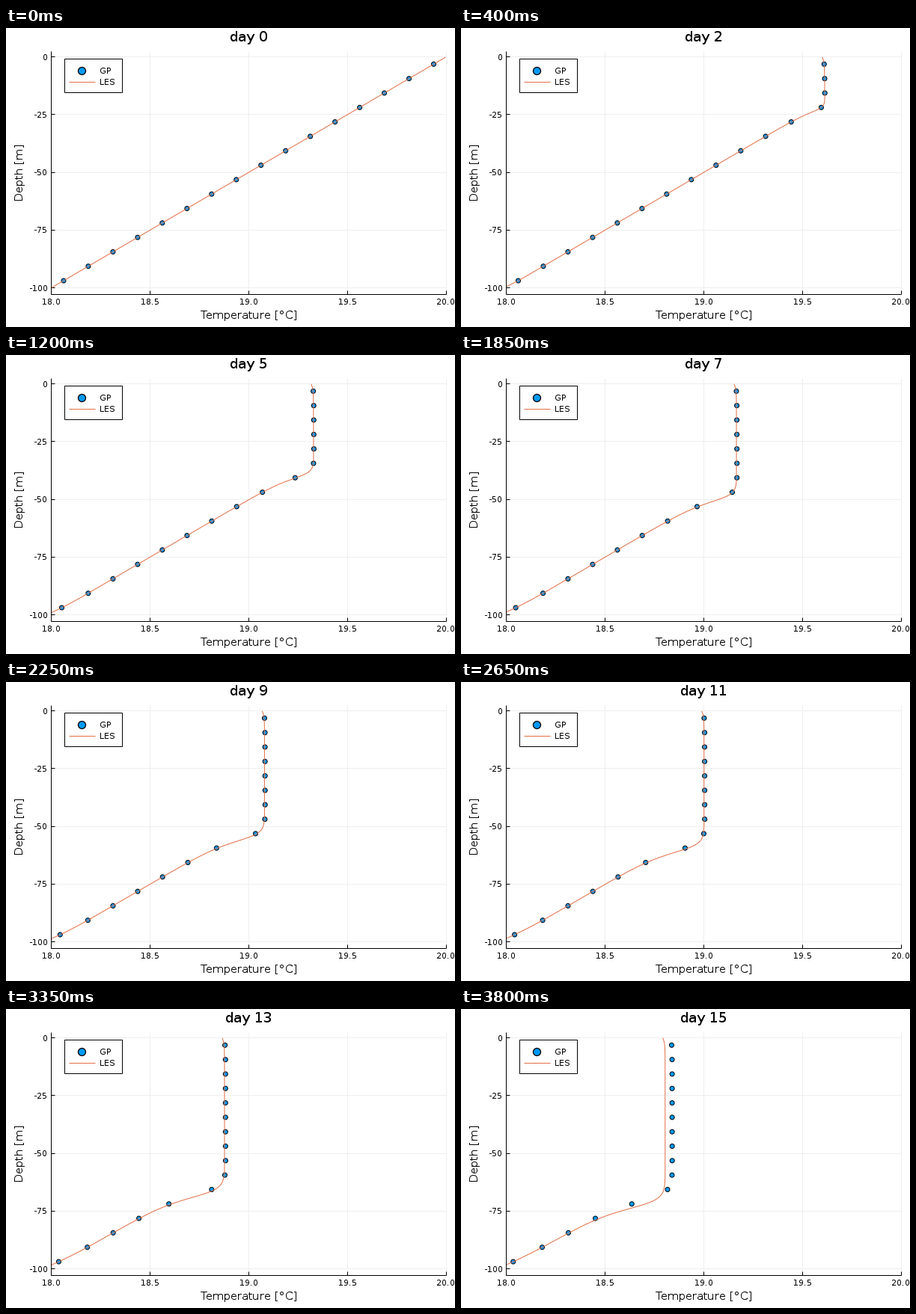
Write a matplotlib script that moves like this. It is 600 by 400 pixels and loops after 3.85 s.

```python
import math

import matplotlib.pyplot as plt
import numpy as np
from matplotlib.animation import FuncAnimation
from matplotlib.patches import Rectangle

W, H, DPI = 600, 400, 100
FRAMES, INTERVAL = 77, 50
PX = 72 / DPI  # one pixel in points

LEFT, RIGHT, TOP, BOTTOM = 60.5, 588.0, 31.0, 356.2
X_SCALE = (RIGHT - LEFT) / 2  # pixels per degree
Y_ZERO, Y_SCALE = 38.7, 3.09  # pixel of the surface, pixels per metre
TICK = 5

BLUE, ORANGE, GRID = "#009af9", "#e26f46", "#eeeeee"

# Whole-pixel letter spacing
plt.rcParams.update({
    "font.family": "DejaVu Sans",
    "text.hinting": "default",
    "text.hinting_factor": 1,
})
erfc = np.vectorize(math.erfc)


def bottom_cooling(z, i):
    """Cooling that diffuses upward from the lower boundary."""
    length = 11 * math.sqrt(i / 76)
    x = (z + 100) / length
    spread = np.exp(-x**2) / math.sqrt(math.pi) - x * erfc(x)
    return 2.05 / X_SCALE * length * spread


def profile(z, drop, i, deepening):
    """Temperature at depth z once the mixed layer has cooled by drop."""
    linear = 20 + z / 50
    if i == 0:
        return linear
    s = -z / (50 * drop)
    u = s - 1.17 - deepening * i
    width = 0.044 * (drop / 0.75) ** -0.45
    blend = 1 / (1 + np.exp(u / (width * (1 + 1.5 * np.abs(u)))))
    mixed = linear + drop * (s - 1) * blend
    return mixed - 0.012 * np.exp(z / 2) - bottom_cooling(z, i)


def les(z, i):
    return profile(z, 0.1371 * math.sqrt(i), i, 0.0006)


def gp(z, i):
    lag = 0.015 * i + 0.26 * max(0, i - 66) ** 1.5
    return profile(z, 0.1371 * math.sqrt(i) - lag / X_SCALE, i, 0.0004)


fig = plt.figure(figsize=(W / DPI, H / DPI), dpi=DPI, facecolor="white")

ax = fig.add_axes([LEFT / W, 1 - BOTTOM / H, (RIGHT - LEFT) / W, (BOTTOM - TOP) / H])
ax.set_xlim(18, 20)
ax.set_ylim((Y_ZERO - BOTTOM) / Y_SCALE, (Y_ZERO - TOP) / Y_SCALE)
ax.axis("off")

# Overlay in pixel coordinates, y pointing down
stage = fig.add_axes([0, 0, 1, 1], zorder=-1)
stage.set_xlim(0, W)
stage.set_ylim(H, 0)
stage.axis("off")


def segment(x0, y0, x1, y1, color="black", zorder=2):
    """Line through the pixels that contain the given points."""
    stage.plot([x0 - 0.5, x1 - 0.5], [y0 - 0.5, y1 - 0.5], color=color, lw=PX,
               zorder=zorder, solid_capstyle="butt")


def label(x, y, text, size, ha="center", **kw):
    return stage.text(x, y, text, fontsize=size, ha=ha, va="baseline", **kw)


for k in range(5):
    x = LEFT + k * X_SCALE / 2
    segment(x, TOP, x, BOTTOM, GRID, 1)
    segment(x, BOTTOM, x, BOTTOM - TICK)
    label(x, 369.5, f"{18 + k / 2:.1f}", 8)

    y = Y_ZERO + 25 * k * Y_SCALE
    segment(LEFT, y, RIGHT, y, GRID, 1)
    segment(LEFT, y, LEFT + TICK, y)
    label(55.5, y + 4, str(-25 * k), 8, ha="right")

segment(LEFT, TOP, LEFT, BOTTOM)
segment(LEFT, BOTTOM, RIGHT, BOTTOM)

label(324.5, 389, "Temperature [°C]", 11)
label(23, 193.3, "Depth [m]", 11, rotation=90, rotation_mode="anchor")
title = label(324.25, 18, "", 14)

stage.add_patch(Rectangle((78, 41), 77, 45, fc="white", ec="black", lw=PX, zorder=3))
stage.plot([101], [56.5], "o", ms=10 * PX, mfc=BLUE, mec="black", mew=1.3 * PX, zorder=4)
segment(84, 72.5, 119, 72.5, ORANGE, 4)
label(124.5, 61, "GP", 8, ha="left", zorder=4)
label(124.5, 76, "LES", 8, ha="left", zorder=4)

z_gp = -3.125 - 6.25 * np.arange(16)
z_les = np.linspace(-0.2, -99.8, 256)
# One size per dot keeps their positions free of pixel rounding
dots = ax.scatter(z_gp, z_gp, s=np.full(16, (6 * PX) ** 2), fc=BLUE, ec="black",
                  lw=PX, zorder=2)
curve, = ax.plot([], [], color=ORANGE, lw=PX, zorder=3)


def draw(i):
    title.set_text(f"day {round(i / 5)}")
    dots.set_offsets(np.column_stack([gp(z_gp, i), z_gp]))
    curve.set_data(les(z_les, i), z_les)
    return title, dots, curve


anim = FuncAnimation(fig, draw, frames=FRAMES, interval=INTERVAL,
                     init_func=lambda: draw(0), repeat=True, repeat_delay=0)
plt.show()
```
